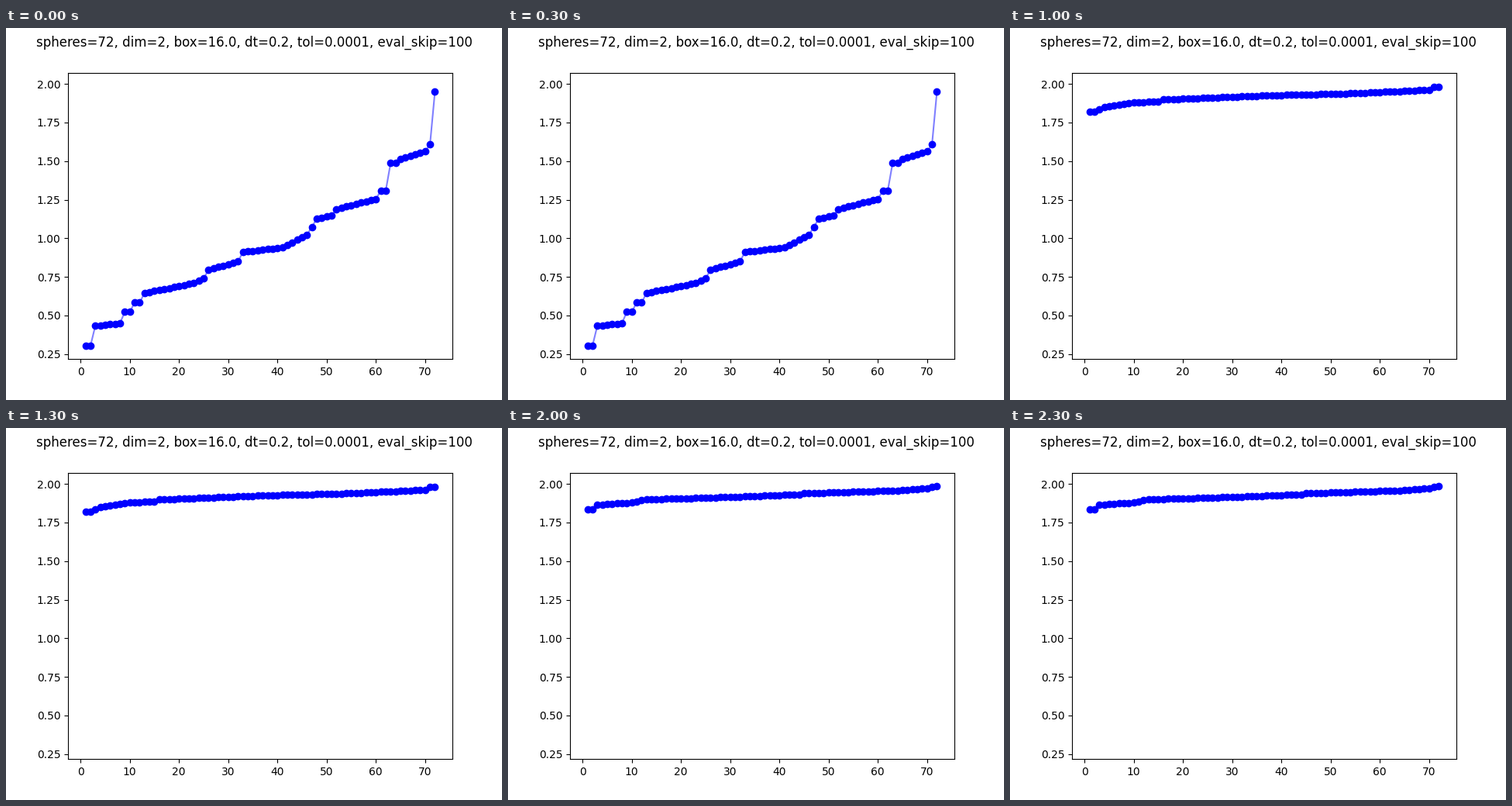
A matplotlib script that plays this animation: 640 px wide and 480 px high, repeating every 2500 ms.

```python
import numpy as np
import matplotlib.pyplot as plt
from matplotlib.animation import FuncAnimation

SPHERES = 72
INTERVAL = 500
index = np.arange(1, SPHERES + 1)


def curve(*points):
    """Sorted distances, rising evenly between a few key points."""
    return np.interp(index, *zip(*points))


# The spread-out start climbs in jumps; later stages are almost flat.
stages = [
    curve((1, .302), (2, .302), (3, .433), (8, .450), (9, .523), (10, .523),
          (11, .584), (12, .584), (13, .645), (23, .710), (25, .740),
          (26, .795), (32, .852), (33, .910), (41, .942), (46, 1.022),
          (48, 1.127), (51, 1.147), (52, 1.189), (60, 1.255), (61, 1.307),
          (62, 1.307), (63, 1.488), (64, 1.488), (65, 1.516), (70, 1.563),
          (71, 1.608), (72, 1.95)),
    curve((1, 1.793), (4, 1.806), (7, 1.838), (12, 1.858), (26, 1.885),
          (49, 1.914), (62, 1.934), (63, 1.944), (70, 1.957), (72, 1.976)),
    curve((1, 1.818), (2, 1.818), (4, 1.850), (10, 1.879), (15, 1.887),
          (16, 1.899), (38, 1.926), (53, 1.937), (70, 1.961), (71, 1.980)),
    curve((1, 1.839), (4, 1.845), (5, 1.860), (8, 1.866), (9, 1.883),
          (21, 1.902), (33, 1.922), (44, 1.931), (54, 1.948), (62, 1.952),
          (71, 1.971), (72, 1.9887)),
    curve((1, 1.833), (2, 1.833), (3, 1.864), (10, 1.880), (13, 1.900),
          (27, 1.912), (44, 1.932), (45, 1.939), (64, 1.957), (70, 1.971),
          (72, 1.986)),
]

fig, ax = plt.subplots(figsize=(6.4, 4.8), dpi=100)
fig.suptitle("spheres=72, dim=2, box=16.0, dt=0.2, tol=0.0001, eval_skip=100")

dots, = ax.plot(index, stages[0], "bo")
line, = ax.plot(index, stages[0], "b-", alpha=0.5)

low, high = np.min(stages), np.max(stages)
pad = 0.05 * (high - low)
ax.set_ylim(low - pad, high + pad)


def update(i):
    for artist in (dots, line):
        artist.set_ydata(stages[i])
    return dots, line


anim = FuncAnimation(fig, update, frames=len(stages), interval=INTERVAL,
                     repeat=True, repeat_delay=0)
plt.show()
```
